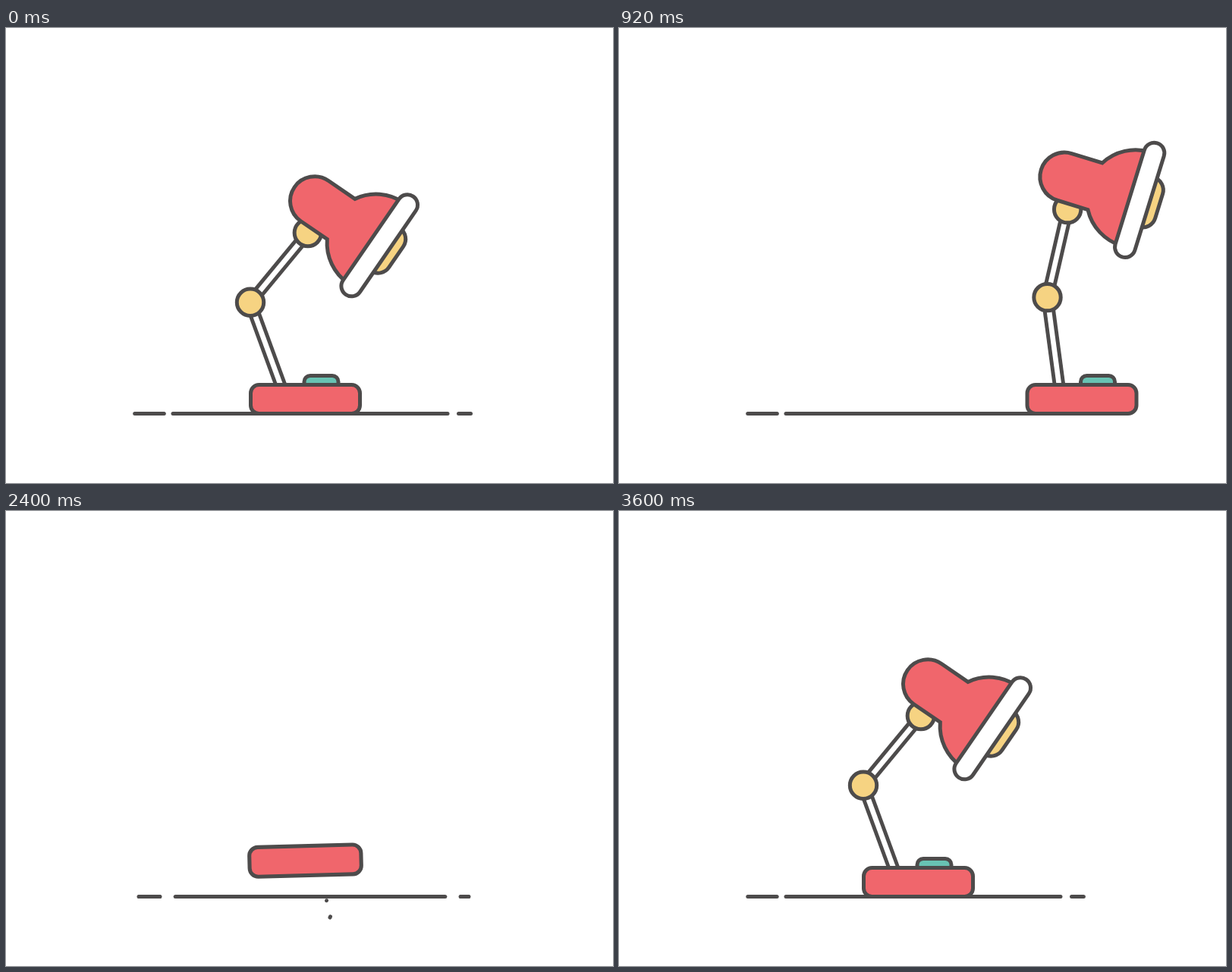
Animation of 800 by 600 pixels, one loop 3620 ms. Source, as an HTML page with a canvas:

```html
<!DOCTYPE html>
<html>
<head>
<meta charset="utf-8">
<title>Desk lamp</title>
<style>
html, body { margin: 0; width: 100%; height: 100%; overflow: hidden; background: #fff; }
canvas { display: block; }
</style>
</head>
<body>
<canvas width="800" height="600"></canvas>
<script>
const ctx = document.querySelector('canvas').getContext('2d');
const LOOP = 3620, GONE = 1215, RAD = Math.PI / 180;
const INK = '#4d4b4b', RED = '#f0666c', YELLOW = '#f6d382', TEAL = '#68c3b3', WHITE = '#fff';
const LOWER = 128, UPPER = 119, KNOB = 17.7;

const mix = (a, b, p) => a + (b - a) * p;
const ramp = (t, a, b) => Math.min(1, Math.max(0, (t - a) / (b - a)));
const ease = (t, a, b) => { const p = ramp(t, a, b); return p * p * (3 - 2 * p); };
const hump = p => Math.max(0, 4 * p * (1 - p));
const blend = (a, b, p) =>
  Object.fromEntries(Object.keys(a).map(k => [k, mix(a[k], b[k], p)]));

function spring(t, start, rise, amp, decay, period = 0.4) {
  const d = (t - start - rise) / 1000;
  if (d < 0) return ramp(t, start, start + rise);
  return 1 + amp * Math.exp(-decay * d) * Math.sin(2 * Math.PI * d / period);
}
const popIn = (t, start) => t < GONE ? 1 : spring(t, start, 80, 0.3, 12, 0.25);

// Arm and head angles in degrees, head mount point, growth
const rest = { lower: 249.9, upper: 309.6, tilt: 394.5, mx: 16.4, my: 39.7, grow: 1 };
const crouch = { ...rest, lower: 209, upper: 207, tilt: 314 };
const stretch = { ...rest, lower: 280, upper: 308, tilt: 398 };
const trail = { ...rest, lower: 252, upper: 265, tilt: 390 };
const land = { ...rest, lower: 254.8, upper: 325, tilt: 429.4, mx: 25.5 };
const unfold = { lower: 219.8, upper: 222.4, tilt: 186, mx: -17.5, my: -6.5, grow: 1.09 };
const MOVES = [
  [0, rest], [230, crouch], [390, stretch], [560, land], [620, land],
  [840, crouch], [960, stretch], [1080, trail], [1220, stretch],
  [2600, { ...unfold, grow: 0 }], [2900, unfold], [2960, unfold],
  [3200, blend(unfold, rest, 1.03)], [3460, rest], [LOOP, rest]
];

function poseAt(t) {
  const i = MOVES.findIndex(([time]) => time > t);
  const [t0, from] = MOVES[i - 1], [t1, to] = MOVES[i];
  return blend(from, to, ease(t, t0, t1));
}

function at(x, y, angle, sx, sy, draw) {
  if (!sx || !sy) return;
  ctx.save();
  ctx.translate(x, y);
  ctx.rotate(angle * RAD);
  ctx.scale(sx, sy);
  draw();
  ctx.restore();
}

function paint(fill, trace) {
  ctx.beginPath();
  trace();
  if (fill) { ctx.fillStyle = fill; ctx.fill(); }
  ctx.strokeStyle = INK;
  ctx.stroke();
}
const box = (fill, w, h, r) => paint(fill, () => ctx.roundRect(-w / 2, -h / 2, w, h, r));
const disc = (fill, r) => paint(fill, () => ctx.arc(0, 0, r, 0, 7));

function segment(x1, y1, x2, y2) {
  ctx.moveTo(x1, y1);
  ctx.lineTo(x2, y2);
}

// Closed wavy shape with the given number of rounded corners
function blob(fill, corners, radius, wave, turn) {
  paint(fill, () => {
    for (let a = 0; a < 360; a += 5) {
      const r = radius + wave * Math.cos(corners * (a - turn) * RAD);
      ctx.lineTo(r * Math.cos(a * RAD), r * Math.sin(a * RAD));
    }
    ctx.closePath();
  });
}

function rod(x1, y1, x2, y2) {
  ctx.save();
  ctx.lineCap = 'butt';
  for (const [width, color] of [[16.5, INK], [6.6, WHITE]]) {
    ctx.lineWidth = width;
    ctx.strokeStyle = color;
    ctx.beginPath();
    segment(x1, y1, x2, y2);
    ctx.stroke();
  }
  ctx.restore();
}

function ground(t) {
  const out = t < GONE;
  const main = out ? 1 - ease(t, 1040, GONE) : spring(t, 1600, 70, 0.36, 4);
  const dash = out ? 1 - ramp(t, 1050, 1110) : spring(t, 2020, 40, 1, 3.5);
  const line = (x, half, s) => at(x, 508.5, 0, s, 1, () => paint(null, () => segment(-half, 0, half, 0)));
  line(401, 181, main);
  line(189, 19.3, dash);
  line(604.5, 8, dash);
}

// Confetti: flight target, shape, and stroke length for lines that draw themselves
const CONFETTI = [
  { x: 569, y: 547, trim: 32, draw: () => paint(null, () => {
    ctx.moveTo(-7, 11);
    ctx.bezierCurveTo(3, 10, -3, -12, 7, -12);
  }) },
  { x: 722, y: 548, trim: 53, draw: () => paint(null, () => ctx.arc(0, 0, 10.3, -32 * RAD, 250 * RAD)) },
  { x: 513, y: 482, draw: () => blob(RED, 4, 12.3, 2.4, 38) },
  { x: 561, y: 482, draw: () => blob(YELLOW, 3, 10.8, 2.2, 7) },
  { x: 613, y: 506, draw: () => disc(TEAL, 10) },
  { x: 574.5, y: 437, draw: () => disc(INK, 2.5) },
  { x: 620.5, y: 417.5, draw: () => paint(null, () => {
    segment(-16, -8, 16, 8);
    segment(8, -16, -8, 16);
  }) }
];

function confetti(t) {
  const fly = ease(t, 2400, 2980) / 0.948;
  CONFETTI.forEach(({ x, y, trim, draw }, i) => {
    const begin = 2375 + 25 * i;
    const size = ease(t, begin, begin + 220) * (1 - ease(t, 3220, 3340));
    if (!size) return;
    const [fromX, fromY] = trim ? [422, 524] : [440, 495];
    const scale = trim ? 1 : size;
    at(mix(fromX, x, fly), mix(fromY, y, fly), (fly - 1) * 55, scale, scale, () => {
      if (trim) ctx.setLineDash([trim * size, 99]);
      draw();
    });
  });
}

function head(t) {
  const bulb = popIn(t, 3130), rim = popIn(t, 3030);
  at(113, 0, 0, bulb, bulb, () => box(YELLOW, 34.5, 68, 18));
  ctx.lineJoin = 'miter';
  paint(RED, () => {
    ctx.arc(98, 0, 64.5, 90 * RAD, 150 * RAD);
    ctx.arc(0, 0, 32.3, 90 * RAD, 270 * RAD);
    ctx.arc(98, 0, 64.5, 210 * RAD, 270 * RAD);
    ctx.closePath();
  });
  ctx.lineJoin = 'round';
  at(103.6, 0, 0, Math.min(1, rim), rim, () => box(WHITE, 27, 157, 13.5));
}

function base(t) {
  const toss = t < GONE ? 0 : hump(ramp(t, 1829, 2411));
  const size = t < GONE ? 1 : (1 + 0.33 * toss) * ramp(t, 1830, 1930);
  const angle = t < GONE ? 0 : 12 * (2358 - Math.min(t, 2411)) / 338 * (1 - ease(t, 2411, 2500));
  at(394.5, 489.5 - 420 * toss, angle, size, size, () => box(RED, 144, 38, 11));
}

function button(t) {
  if (t > GONE && t < 2690) return;
  const toss = ramp(t, 2690, 3260);
  at(415.5, 467 - 352 * hump(toss), -180 * ease(toss, 0, 1), 1, 1, () => box(TEAL, 45, 17, 8));
}

function lamp(t) {
  const hop1 = ramp(t, 270, 520), hop2 = ramp(t, 940, 1220);
  const { lower, upper, tilt, mx, my, grow } = poseAt(t);
  const shown = t < GONE || t > 2600, size = Math.min(1, grow);
  const x0 = 366, y0 = 482;
  const x1 = x0 + LOWER * grow * Math.cos(lower * RAD), y1 = y0 + LOWER * grow * Math.sin(lower * RAD);
  const x2 = x1 + UPPER * size * Math.cos(upper * RAD), y2 = y1 + UPPER * size * Math.sin(upper * RAD);

  ctx.save();
  if (t < GONE) ctx.translate(215.5 * hop1 + 430 * hop2, -100 * hump(hop1) - 120 * hump(hop2));
  if (shown) rod(x0, y0, x1, y1);
  button(t);
  base(t);
  if (shown) {
    const knuckle = size * popIn(t, 3000), swell = Math.min(1.025, grow);
    rod(x1, y1, x2, y2);
    at(x1, y1, 0, size, size, () => disc(YELLOW, KNOB));
    at(x2, y2, 0, knuckle, knuckle, () => disc(YELLOW, KNOB));
    at(x2, y2, tilt, swell, swell, () => {
      ctx.translate(-mx, -my);
      head(t);
    });
  }
  ctx.restore();
}

const start = performance.now();
function tick() {
  const t = (performance.now() - start) % LOOP;
  ctx.fillStyle = WHITE;
  ctx.fillRect(0, 0, 800, 600);
  ctx.lineWidth = 5;
  ctx.lineCap = ctx.lineJoin = 'round';
  confetti(t);
  ground(t);
  lamp(t);
  requestAnimationFrame(tick);
}
tick();
</script>
</body>
</html>
```
